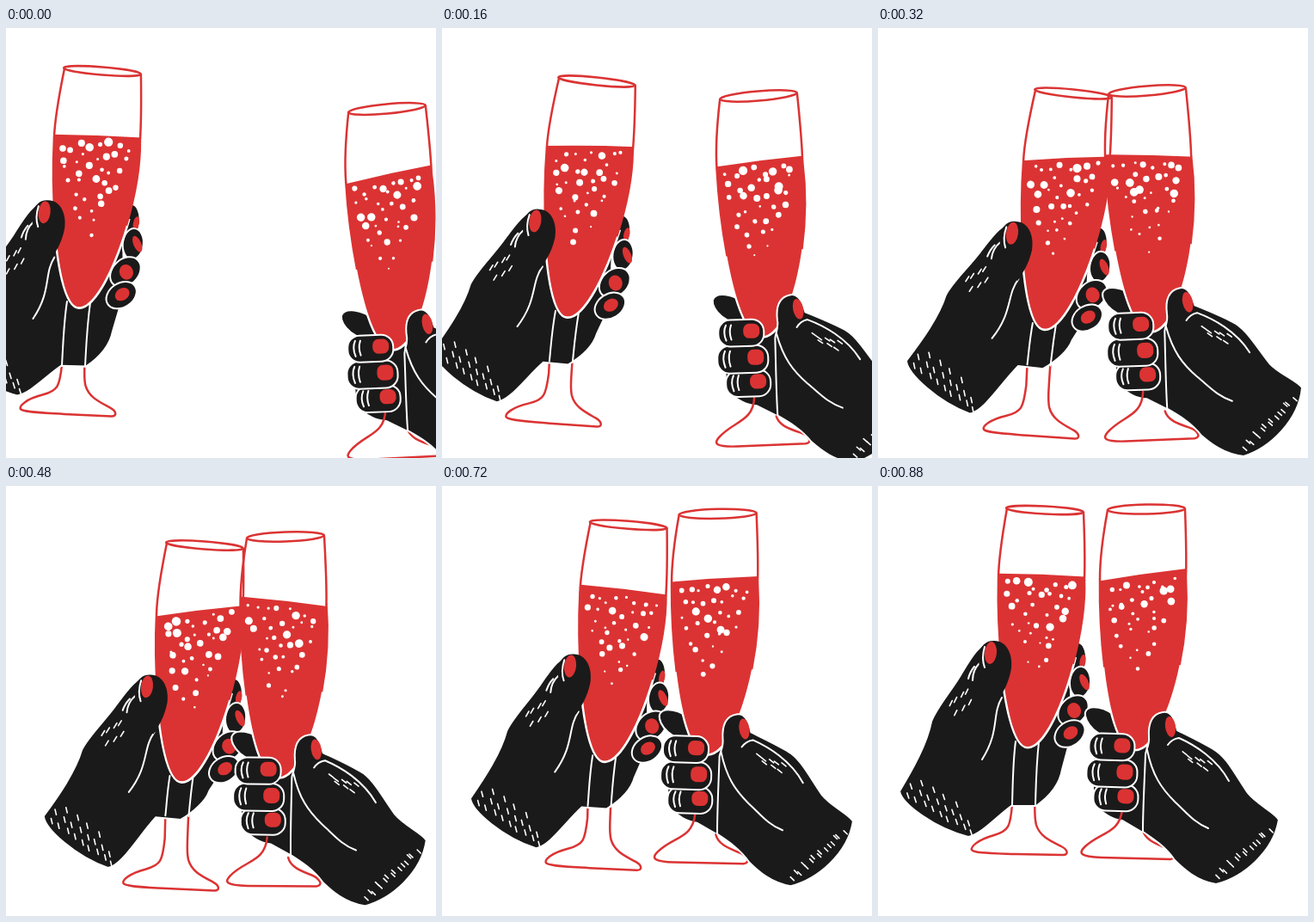
Recreate the animation shown at these times as an HTML page. Size 500 by 500 pixels, loop 960 ms.

```html
<!DOCTYPE html>
<html lang="en">
<head>
<meta charset="utf-8">
<title>Cheers</title>
<style>
  html, body { margin: 0; width: 100%; height: 100%; overflow: hidden; background: #fff; }
  svg { display: block; width: 100vw; height: 100vh; }
  .skin { fill: #1b1a1a; stroke: #fff; stroke-width: 2; }
  .bare { fill: #1b1a1a; }
  .red { fill: #db3333; }
  .line, .wall { fill: none; stroke: #db3333; stroke-width: 2.5; stroke-linecap: round; }
  .wall { stroke-dasharray: 24 52 24; stroke-linecap: butt; }
  .cut, .hair { fill: none; stroke: #fff; stroke-width: 2; stroke-linecap: round; }
  .hair { stroke-width: 1.6; }
  .gap { fill: none; stroke: #fff; stroke-width: 5; stroke-dasharray: 0 22 56 22; }
  .bubbles { fill: #fff; }
</style>
</head>
<body>
<svg id="stage" viewBox="0 0 500 500"></svg>
<script>
const STEP = 80;
const STEPS = 12;

function randomizer(seed) {
  return () => {
    seed = (seed + 0x6D2B79F5) | 0;
    let t = Math.imul(seed ^ (seed >>> 15), 1 | seed);
    t ^= t + Math.imul(t ^ (t >>> 7), 61 | t);
    return ((t ^ (t >>> 14)) >>> 0) / 4294967296;
  };
}

const path = (cls, d) => `<path class="${cls}" d="${d}"/>`;
const group = (transform, content) => `<g transform="${transform}">${content}</g>`;
const oval = (cls, x, y, rx, ry, turn = 0) =>
  `<ellipse class="${cls}" cx="${x}" cy="${y}" rx="${rx}" ry="${ry}" transform="rotate(${turn} ${x} ${y})"/>`;

// A loose row of short strokes between two points
function hairs(x1, y1, x2, y2, count, dx, dy) {
  const rnd = randomizer(x1 * 7 + y1);
  let d = '';
  for (let i = 0; i < count; i++) {
    const p = i / (count - 1);
    d += `M${x1 + (x2 - x1) * p + rnd() * 3} ${y1 + (y2 - y1) * p + rnd() * 3}l${dx} ${dy}`;
  }
  return path('hair', d);
}

// Finger with its nail on the right end and two knuckle creases on the left
const finger = (x, y, w, h) => group(`rotate(2 ${x} ${y})`,
  `<rect class="skin" x="${x}" y="${y}" width="${w}" height="${h}" rx="14"/>
   <rect class="red" x="${x + w - 24}" y="${y + 5}" width="19" height="${h - 14}" rx="7"/>` +
  path('cut', `M${x + 9} ${y + 6}q-4 8 0 ${h - 13}m6 ${13 - h}q-3 8 0 ${h - 14}`));

const leftPalm = lift => path('skin',
  `M134 180C118 182 108 200 96 220C84 240 68 258 62 274C57 300 40 330 25 355C28 370 66 398 105 408
   C121 404 136 ${386 - lift * .6} 155 ${372 - lift}L184 ${372 - lift}
   C198 ${362 - lift} 211 ${348 - lift} 214 ${330 - lift * .8}L226 285L222 195L150 200Z`);

// Key poses: step, rim x, rim y, turn in degrees
const sides = [
  {
    id: 'left', cx: 194, cy: 28, rimHeight: 4.5, rimTurn: 3,
    sideL: 'M150 26C144 60 140 85 140 108', start: 'M140 108',
    bowl: 'C138 185 150 303 174 303C203 303 243 180 240 108',
    sideR: 'C241 80 240 55 239 31', end: 'M240 108',
    stem: 'M156 335L156 370C154 396 152 401 135 406C114 412 108 420 109 423C111 427 130 427 160 428L215 429C222 429 221 423 213 419C199 412 188 407 184 394C182 386 182 380 183 335',
    stemOver: lift => `M160 297C157 320 157 335 156 ${371 - lift}M187 298C184 325 184 335 183 ${371 - lift}`,
    keys: [[0, 112, 50, 1.5], [2, 180, 62, 3], [4, 227, 76, 2.8], [6, 231, 69, 1.4], [8, 228, 54, 2.4], [11, 194, 28, 0]],
    slope: step => 9 - 2.6 * ((step + 3) % STEPS),
    back: sway => group(`rotate(${4 * sway} 132 200)`,
      leftPalm(28 * sway) +
      path('cut', 'M144 246C132 266 142 285 121 318M118 206q-8 8 -8 20M112 210q-5 6 -7 14') +
      hairs(37, 346, 104, 388, 8, 2, 6) + hairs(33, 356, 106, 398, 9, 2, 6) +
      hairs(48, 341, 88, 367, 4, 2, 6) +
      hairs(104, 234, 84, 248, 4, -3, 6) + hairs(107, 246, 90, 259, 3, -3, 6)) +
      oval('skin', 231, 203, 11, 21, 5) + oval('red', 238, 204, 3.5, 8, 10) +
      oval('skin', 235, 228, 12, 18, 5) + oval('red', 240, 228, 4.5, 10, -25) +
      oval('skin', 227, 261, 20, 15, -45) + oval('red', 228, 261, 8, 9, -20) +
      oval('skin', 223, 288, 19, 14, -35) + oval('red', 224, 287, 9, 7, -35),
    front: () =>
      path('bare', 'M134 180C149 179 157 195 155 212C152 230 145 240 140 249L122 240L116 196C120 186 125 180 134 180Z') +
      oval('red', 131, 194, 7, 13, 5) + path('cut', 'M124 187q-4 13 0 24')
  },
  {
    id: 'right', cx: 312, cy: 27, rimHeight: 5.5, rimTurn: -1,
    sideL: 'M267 28C262 55 258 80 258 108', start: 'M258 108',
    bowl: 'C257 180 268 306 299 306C328 306 364 205 358 106',
    sideR: 'C359 80 358 55 357 27', end: 'M358 106',
    stem: 'M284 376C281 405 258 402 240 420C233 427 235 431 260 432L340 434C349 433 344 425 335 421C320 415 310 410 308 400',
    stemOver: () => '',
    keys: [[0, 443, 94, -4.3], [2, 368, 79, -3.8], [4, 313, 73, -3.8], [6, 325, 59, -1.1], [8, 325, 35, -.4], [11, 312, 27, 0]],
    slope: step => -14 * Math.cos(2 * Math.PI * step / 11),
    back: sway => group(`translate(${4 * sway} ${-5 * sway})`,
      path('skin', 'M250 300L250 366C260 382 274 388 284 389L308 403L313 300L280 285Z') +
      path('skin', 'M284 296C254 294 239 274 241 263C245 253 266 257 278 270Z')),
    front: sway => group(`translate(${3 * sway} ${-5 * sway})`,
      finger(251, 346, 52, 31) + finger(243, 317, 59, 32) + finger(246, 287, 53, 31) +
      path('skin', 'M331 263C319 265 314 276 315 292C316 300 312 306 311 312C310 340 308 375 308 402C320 410 335 420 345 435C355 445 370 459 393 463C425 455 460 425 466 388C462 380 440 370 430 357C415 335 405 314 390 306C375 297 360 290 348 284C345 270 340 261 331 263Z') +
      oval('red', 340, 280, 6, 12, -8) +
      path('cut', 'M313 307C319 336 329 351 345 367C359 380 367 391 384 398M337 301Q342 294 350 293C368 301 394 317 408 343') +
      hairs(352, 308, 381, 319, 5, 5, 4) + hairs(360, 317, 378, 327, 3, 5, 4) +
      hairs(453, 396, 392, 452, 9, 4, 4) + hairs(443, 404, 396, 442, 6, 4, 4))
  }
];

function poseAt(keys, step) {
  const next = keys.findIndex(key => key[0] > step);
  if (next < 0) return keys.at(-1).slice(1);
  const a = keys[next - 1], b = keys[next];
  const p = (step - a[0]) / (b[0] - a[0]);
  return a.slice(1).map((v, i) => v + (b[i + 1] - v) * p);
}

// A narrowing swarm of bubbles below the surface
function bubbles(cx, top, slope, seed) {
  const rnd = randomizer(seed);
  let out = '';
  for (let row = 0; row < 8; row++) {
    const count = 8 - row;
    const half = 43 * (1 - (row / 8.5) ** 1.5);
    for (let i = 0; i < count; i++) {
      const depth = 12 + row * 14 + (rnd() - .5) * 12;
      const across = ((i + .5 + (rnd() - .5) * .6) / count * 2 - 1) * half;
      const r = (1.5 + 4 * rnd() ** 1.7) * (1 - row * .05);
      out += `<circle cx="${cx - 4 - depth * .07 + across}" cy="${top + depth + slope * across / 95}" r="${r}"/>`;
    }
  }
  return `<g class="bubbles">${out}</g>`;
}

function glass(side, step, sway) {
  const { id, cx, cy, sideL, start, bowl, sideR, end } = side;
  const slope = side.slope(step);
  const top = cy + 76;
  const drink = `M${cx - 60} ${top - slope * .6}Q${cx} ${top - 2} ${cx + 60} ${top + slope * .6}V320H${cx - 60}Z`;
  return `<clipPath id="${id}-bowl"><path d="${sideL}${bowl}${sideR}Z"/></clipPath>
    ${path('line', side.stem)}${path('cut', side.stemOver(28 * sway))}
    <path class="gap" pathLength="100" d="${start}${bowl}"/>
    <g clip-path="url(#${id}-bowl)">${path('red', drink)}</g>
    ${bubbles(cx, top, slope, step * 2 + cx)}
    <path class="wall" pathLength="100" d="${start}${bowl}"/>
    ${path('line', `${sideL}${end}${sideR}`)}
    ${oval('line', cx, cy, 45, side.rimHeight, side.rimTurn)}`;
}

function draw(side, step) {
  const sway = Math.sin(Math.PI * step / (STEPS - 1));
  const [x, y, turn] = poseAt(side.keys, step);
  // The lower part of the stem shows only below the palm
  const parts = side.stemOver(0)
    ? glass(side, step, sway).replace(path('line', side.stem), '')
    : glass(side, step, sway);
  const behind = side.stemOver(0) ? path('line', side.stem) : '';
  return group(`translate(${x} ${y}) rotate(${turn}) translate(${-side.cx} ${-side.cy})`,
    behind + side.back(sway) + parts + side.front(sway));
}

const stage = document.getElementById('stage');
let shown = -1;
function tick() {
  const step = Math.floor(performance.now() / STEP) % STEPS;
  if (step !== shown) {
    shown = step;
    stage.innerHTML = sides.map(side => draw(side, step)).join('');
  }
  requestAnimationFrame(tick);
}
tick();
</script>
</body>
</html>
```
